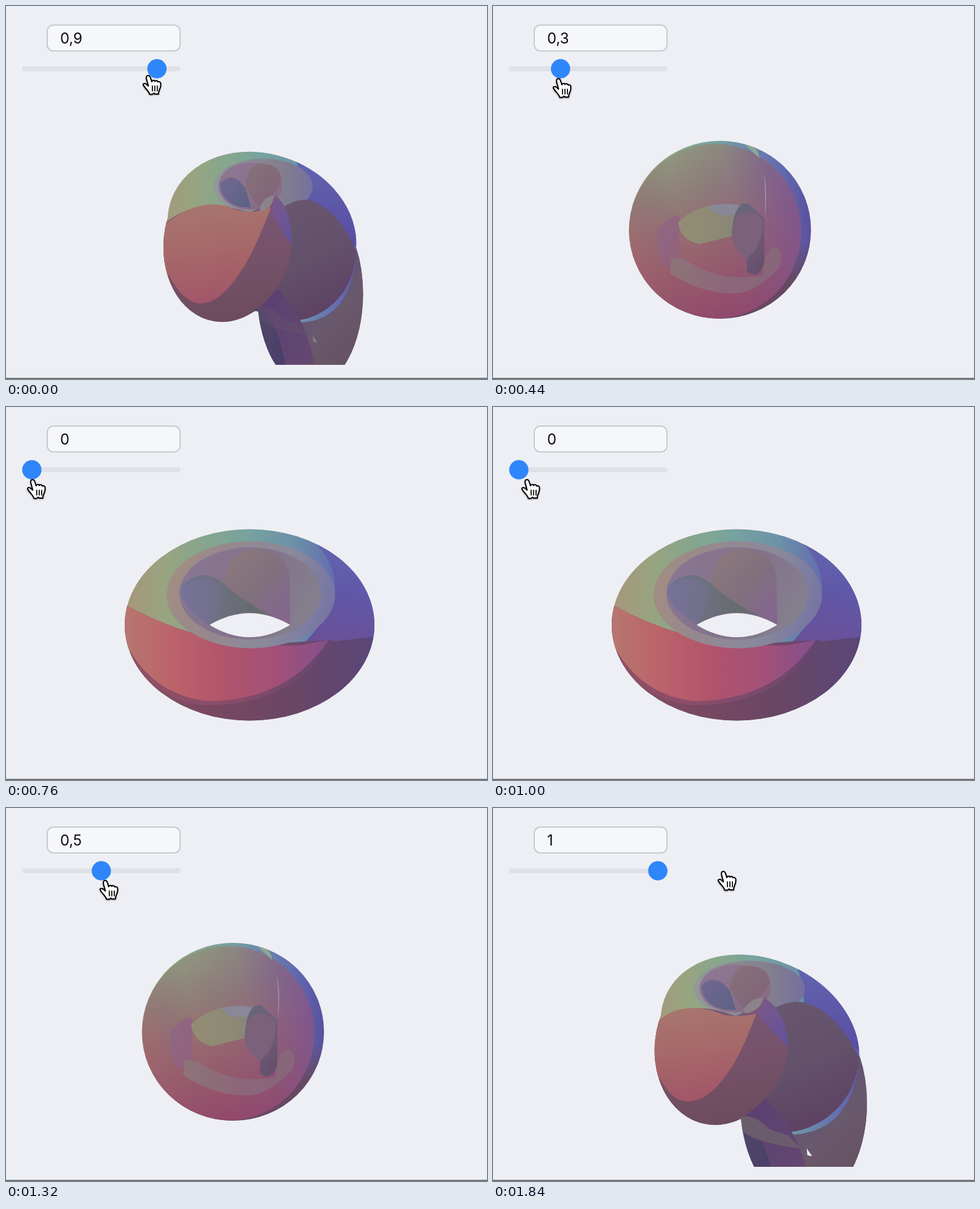
An HTML page for the animation above (1.88 s loop, 782 by 606 pixels).

```html
<!DOCTYPE html>
<html lang="en">
<head>
<meta charset="utf-8">
<title>Shape morph slider</title>
<style>
html, body { margin: 0; width: 100%; height: 100%; overflow: hidden; background: #eeeff4; }
svg { display: block; width: 782px; height: 606px; }
text { font: 24px Inter, "Liberation Sans", sans-serif; fill: #0c0d10; }
#cursor { filter: drop-shadow(0 1.5px 1px #0006); }
</style>
</head>
<body>
<svg viewBox="0 0 782 606">
  <defs>
    <clipPath id="canvas"><rect width="782" height="583"/></clipPath>
    <clipPath id="body">
      <ellipse id="crownEdge"/><ellipse id="frontEdge"/><ellipse id="tailEdge"/>
    </clipPath>
  </defs>
  <g clip-path="url(#canvas)">
    <g clip-path="url(#body)">
      <g id="torus"></g>
      <g id="disc"></g>
      <g id="curl">
        <g id="crown"></g><g id="bowl"></g>
        <g id="tail"><g id="lobe"></g><g id="seam"></g></g>
        <g id="front"></g>
      </g>
    </g>
    <path id="hole" fill="#eeeff4" d="M331 354Q396 316 462 354Q396 394 331 354Z"/>
  </g>
  <rect x="67" y="31" width="216" height="42" rx="10" fill="#f6f7fb" stroke="#c9cacf" stroke-width="2"/>
  <text id="value" x="88" y="61"></text>
  <rect x="26" y="98" width="258" height="8" rx="4" fill="#e0e1e6"/>
  <circle id="knob" cy="102" r="15.7" fill="#2f86fb"/>
  <g id="cursor" stroke="#000" stroke-linecap="round" stroke-linejoin="round">
    <path fill="#fff" stroke-width="2" d="M9.5 18L6.5 7C5.5 3 7 1 9 1S12.5 3 13 5L15 11C15.5 8.5 19 8 20 10.5C21 8.5 24.5 9 25 11.5C27 10.5 29.5 11.5 29.5 14C30 18 29 21 27.5 24Q26 27 26 31H20L18.500 29.500L16 31.500H11.500Q11 29 7 24Q3 20 1 16C1 13.500 4 13.500 6 15Z"/>
    <path fill="none" stroke-width="1.7" d="M16 18v8M20 18v8M24 18v8"/>
  </g>
  <rect y="604" width="782" height="2" fill="#77787b"/>
</svg>
<script>
const LOOP = 1880, STEP = 40;
const el = id => document.getElementById(id);
const clamp = x => Math.max(0, Math.min(1, x));
const mix = (a, b, k) => a + (b - a) * k;

function make(tag, attrs, parent) {
  const node = document.createElementNS('http://www.w3.org/2000/svg', tag);
  for (const name in attrs) node.setAttribute(name, attrs[name]);
  return parent.appendChild(node);
}

const oval = (cx, cy, rx, ry) =>
  `M${cx - rx} ${cy}a${rx} ${ry} 0 0 1 ${2 * rx} 0a${rx} ${ry} 0 0 1 ${-2 * rx} 0Z`;
const box = (x, y, x2, y2) => `M${x} ${y}H${x2}V${y2}H${x}Z`;

// A shape with evenly spaced gradient stops; angle 0 runs right, 90 runs down
let count = 0;
function patch(group, d, angle, ...colors) {
  const id = 'paint' + count++;
  const attrs = { id, gradientTransform: `rotate(${angle} .5 .5)` };
  const grad = make('linearGradient', attrs, document.querySelector('defs'));
  colors.forEach((color, i) =>
    make('stop', { offset: i / Math.max(1, colors.length - 1), 'stop-color': color }, grad));
  return make('path', { d, fill: `url(#${id})` }, el(group));
}

const sky = ['#a8957a', '#98a480', '#85a68e', '#76a29f', '#6c91a8', '#646eaf', '#5a50a2'];

// Torus: outer skin, rim, inner wall
patch('torus', box(190, 195, 602, 515), 0, ...sky);
patch('torus', 'M503 220Q540 260 534 305Q520 350 480 388L610 372V200Z', 100, '#6469b3', '#6058a8', '#6a5098');
patch('torus', 'M185 316Q320 395 480 387L610 372V520H185Z', 0, '#8e5362', '#784860', '#694665', '#58467a');
patch('torus', 'M190 400Q260 490 340 484Q470 480 532 378Z', 0, '#915064', '#884c6b', '#64466f');
patch('torus', 'M185 316Q320 395 480 387L525 378Q460 476 330 478Q240 470 195 385L185 400Z', 0,
  '#b57970', '#bc636a', '#b1546c', '#a35078', '#82508c');
patch('torus', oval(398, 305, 137, 87), 10, '#a18d82', '#94888f', '#8a8a9b', '#7675a4');
patch('torus', oval(397, 303, 115, 75), 20, '#887692', '#84728b', '#84808d');
patch('torus', 'M350 300Q358 233 405 231Q462 235 461 285L462 354Q400 330 350 300Z', 45, '#8b777d', '#80717d', '#83678c');
patch('torus', 'M283 295Q320 250 365 297Q400 325 462 354Q396 314 331 354Q285 325 283 295Z', 0,
  '#6d7393', '#6e7080', '#666b6c', '#737075');
patch('torus', 'M283 295Q320 265 350 295Q350 330 331 354Q285 325 283 295Z', 0, '#77729a', '#716f88');

// Half-folded disc
patch('disc', box(215, 210, 525, 650), 0, '#8fa680', '#8fa880', '#82a68e', '#749fa0', '#6a84ae', '#6068ae', '#5a4c9a');
patch('disc', box(215, 380, 525, 510), 90, '#66486200', '#664862', '#664862');
patch('disc', oval(361, 366, 140, 142), 75, '#8f987e', '#8f8079', '#976a70', '#96586a', '#92486a');
patch('disc', oval(361, 366, 140, 142), -15, '#b0606a55', '#80507800', '#7a539233', '#7a5394cc');
patch('disc', 'M410 226Q430 225 433 247Z', 0, '#8fa692');
patch('disc', 'M440 270Q447 300 442 345Q444 300 440 270Z', 0, '#a19aa3');
patch('disc', 'M268 362Q300 330 303 345L302 400L310 425Q262 440 268 362Z', 45, '#8e6882', '#92607a');
patch('disc', 'M301 352Q335 315 402 324L388 374Q360 381 335 387Q305 380 301 352Z', 0, '#948d76', '#8e8a73', '#888579');
patch('disc', 'M350 326Q375 318 402 324L396 338Q365 345 350 326Z', 0, '#888899');
patch('disc', 'M388 370Q392 315 415 321L441 345V415Q435 445 413 432V412Q390 395 388 370Z', 60, '#67667b', '#705c7b', '#66506d');
patch('disc', 'M389 365Q392 335 412 334Q455 335 428 395L412 412Q390 395 389 365Z', 0, '#7c617a');
patch('disc', 'M290 410H310Q365 450 438 438Q442 392 460 392Q475 402 465 425Q425 470 385 467Q335 465 288 434Z', 0,
  '#8d7478', '#8c6679', '#866779');

// Curl: crown behind, bowl on top, hanging tail, front bulge
patch('crown', box(250, 230, 625, 630), 0, ...sky);
patch('crown', 'M490 250Q507 285 505 318L625 420V230Z', 90, '#6469b1', '#5848a0');
patch('bowl', oval(417, 294, 90, 46), 0, '#93979a', '#8b8b94', '#84808c', '#74709f');
patch('bowl', oval(394, 293, 58, 39), 45, '#8d7791', '#876b88');
patch('bowl', 'M385 295Q388 256 415 256Q450 258 450 285Q435 312 410 328Q395 310 385 295Z', 45, '#857079', '#816378');
patch('bowl', 'M338 290Q360 265 385 297L395 328Q345 330 338 290Z', 45, '#6f6790', '#5f6286');
patch('lobe', 'M595 405L625 400V640H490L470 531Q585 535 595 405Z', 60, '#5c4b80', '#69596c', '#65515f');
patch('lobe', 'M390 495L415 490Q465 540 465 640H390Z', 45, '#514569', '#493f68');
patch('lobe', 'M425 345Q470 312 500 315Q555 325 595 405Q590 470 540 505Q470 550 415 500Z', 70, '#67566e', '#63506b', '#5d4063');
patch('lobe', 'M405 500L440 470Q515 540 515 640H460Q455 545 405 500Z', 45, '#5c4070', '#644872');
patch('seam', 'M400 500Q425 497 450 522L480 532L500 553Q430 545 405 525Z', 0, '#6b5c6c');
patch('seam', 'M510 553L519 566L511 564Z', 0, '#eeeff4');

// Front shapes bend as the curl closes: "a~b" slides from a to b
const bending = [
  ['M246~258 362~355Q310 305 395 333~338Q425 325 435~440 308Q452~478 325~330 450~480 385Q448~475 450~460 397~402 490~504L380 530H240Z',
    80, '#7b5878', '#755268', '#6c4a5c'],
  ['M435~440 308Q452~478 330 449~480 388Q440~455 365 432~430 335Z', 45, '#79588a', '#64549a'],
  ['M240~255 370~360Q305~300 318~305 345~375 314~336Q395~400 345~341 434~428 318~334Q390 440 345 478~468Q300 515~495 258~272 435~440H235Z',
    80, '#a8756f', '#a66768', '#a15569'],
  ['M418~407 327Q422~420 308 432~440 308Q432~435 330 415~410 334Z', 0, '#8d8289']
].map(([d, ...paint]) => ({ d, path: patch('front', '', ...paint) }));

const bend = (d, k) => d.replace(/(\d+)~(\d+)/g, (_, a, b) => mix(+a, +b, k));

// Ellipses as center, radii, tilt
const TORUS = [396, 354, 203, 155.5, 0];
const DISC = [369, 363.5, 148, 144.5, 0];
const CURL = {  // at 0.8 and at 1
  crown: [[398, 361, 145, 126, 15], [434, 374, 168, 128, 25]],
  front: [[350, 378, 100, 134, 8], [371, 382, 107, 134, 12]],
  tail: [[484, 455, 69, 140, 0], [505, 480, 103, 165, 0]],
  bowl: [[419, 293, 71, 45, 0], [417, 294, 90, 46, 0]]
};

const blend = (a, b, k) => a.map((x, i) => mix(x, b[i], k));

function ellipseAt(part, v) {
  const [open, closed] = CURL[part];
  if (part === 'bowl') return blend(open, closed, clamp(v * 5 - 4));
  if (v < .4) return blend(TORUS, DISC, v / .4);
  if (v < .8) return blend(DISC, open, v / .4 - 1);
  return blend(open, closed, v * 5 - 4);
}

function fit(id, from, to) {
  const sx = to[2] / from[2], sy = to[3] / from[3];
  const shift = `${to[0] - from[0] * sx} ${to[1] - from[1] * sy}`;
  el(id).setAttribute('transform', `matrix(${sx} 0 0 ${sy} ${shift})`);
}

function drawSolid(v) {
  for (const part of ['crown', 'front', 'tail']) {
    const [cx, cy, rx, ry, tilt] = ellipseAt(part, v);
    const edge = { cx, cy, rx, ry, transform: `rotate(${tilt} ${cx} ${cy})` };
    for (const name in edge) el(part + 'Edge').setAttribute(name, edge[name]);
  }

  const k = clamp(v * 5 - 4);
  const whole = ellipseAt('crown', v);
  fit('torus', TORUS, whole);
  fit('disc', DISC, whole);
  for (const part of ['crown', 'tail', 'bowl']) fit(part, CURL[part][1], ellipseAt(part, v));
  fit('front', ellipseAt('front', Math.max(v, .8)), ellipseAt('front', v));
  for (const { d, path } of bending) path.setAttribute('d', bend(d, k));

  el('torus').style.opacity = v < .39 ? 1 : 0;
  el('disc').style.opacity = v < .79 ? clamp(v / .4) : 0;
  el('curl').style.opacity = clamp(v / .4 - 1);
  el('seam').style.opacity = k * k;

  const size = clamp(1 - v / .3);
  el('hole').setAttribute('transform', `translate(${396 * (1 - size)} ${360 * (1 - size)}) scale(${size})`);
}

// Slider value in tenths: drag down, rest, drag up
const tenths = t => t < 900
  ? Math.max(0, 9 - Math.floor((Math.max(0, t) + 40) / 80))
  : Math.max(0, Math.min(10, Math.floor((t - 1070) / 50)));

function draw(t) {
  const n = tenths(t);
  el('value').textContent = n % 10 ? '0,' + n : n / 10;
  el('knob').setAttribute('cx', 42 + 22.6 * n);

  // The hand sweeps left, drifts, sweeps right, and lifts toward the right end
  const x = Math.max(222 - .284 * t, 34 + .05 * (t - 760), 152 + .41 * (t - 1320));
  const y = 117 - .07 * Math.max(0, x - 150);
  el('cursor').setAttribute('transform', `translate(${x} ${y})`);

  drawSolid(tenths(t - STEP) / 10);  // the solid trails the slider by one step
}

let start, last;
function tick(now) {
  start ??= now;
  const t = Math.floor((now - start) % LOOP / STEP) * STEP;
  if (t !== last) draw(last = t);
  requestAnimationFrame(tick);
}
draw(0);
requestAnimationFrame(tick);
</script>
</body>
</html>
```
